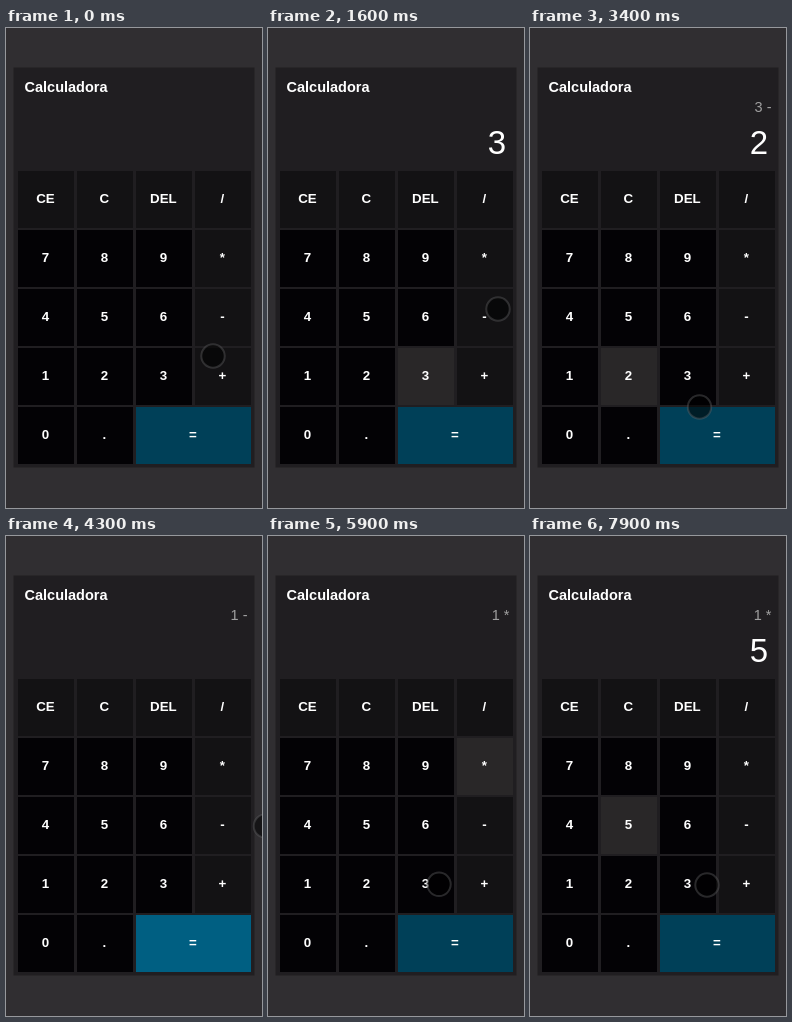
Write an HTML page that moves like this. It is 256 px wide and 480 px high and loops after 8000 ms.

```html
<!DOCTYPE html>
<html lang="es">
<head>
<meta charset="utf-8">
<title>Calculadora</title>
<style>
  html, body { margin: 0; width: 100%; height: 100%; overflow: hidden; background: #302e31; }
  svg { display: block; width: 256px; height: 480px; font-family: "Liberation Sans", Arial, sans-serif; }
  .panel { fill: #201e21; }
  .title { font-size: 14.5px; font-weight: bold; fill: #fff; }
  .pending { font-size: 14.5px; fill: #a0a0a0; text-anchor: end; }
  .entry { font-size: 33px; fill: #fff; text-anchor: end; }
  .key rect { fill: #131214; }
  .key text { font-size: 13.33px; font-weight: bold; fill: #fff; text-anchor: middle; }
  .digit rect { fill: #030205; }
  .equals rect { fill: #004058; }
  .key.focus rect { fill: #292728; }
  .equals.focus rect { fill: #005f82; }
  .pointer { fill: rgba(0, 0, 0, .55); stroke: rgba(100, 100, 103, .4); stroke-width: 2; }
</style>
</head>
<body>
<svg viewBox="0 0 256 480">
  <rect class="panel" x="7.5" y="39.5" width="241" height="400"/>
  <text class="title" x="18.5" y="64">Calculadora</text>
  <text class="pending" x="241.5" y="84"></text>
  <text class="entry" x="238" y="125.5"></text>
  <g id="keys"></g>
  <circle class="pointer" r="11.7"/>
</svg>
<script>
const LOOP = 8000, TICK = 100, REST = 100;
const PITCH = 59, WIDTH = 56, HEIGHT = 57;
const rows = ['CE C DEL /', '7 8 9 *', '4 5 6 -', '1 2 3 +', '0 . ='];

// Each leg takes the pointer to (x, y) on an arc, then presses the key
const home = { x: 207, y: 328, press: -REST };
const legs = [
  { key: '3', x: 160, y: 360, travel: 800, press: 800, bend: 0 },
  { key: '-', x: 230, y: 281, travel: 700, press: 1800, bend: 30 },
  { key: '2', x: 98, y: 350, travel: 800, press: 2800, bend: 79 },
  { key: '=', x: 200, y: 398, travel: 800, press: 3700, bend: -5 },
  { key: '*', x: 220, y: 232, travel: 800, press: 5600, bend: 55 },
  { key: '5', x: 104, y: 291, travel: 300, press: 6800, bend: -112 },
  { key: '', x: 177, y: 349, travel: 1000, press: LOOP, bend: 30 }
];

const $ = s => document.querySelector(s);
const keys = {};

function add(parent, tag, attrs, text = '') {
  const el = document.createElementNS('http://www.w3.org/2000/svg', tag);
  for (const name in attrs) el.setAttribute(name, attrs[name]);
  el.textContent = text;
  return parent.appendChild(el);
}

rows.forEach((row, r) => row.split(' ').forEach((label, c) => {
  const x = 12 + c * PITCH, y = 143 + r * PITCH;
  const width = label === '=' ? WIDTH + PITCH : WIDTH;
  const kind = label === '=' ? ' equals' : /[\d.]/.test(label) ? ' digit' : '';
  const key = keys[label] = add($('#keys'), 'g', { class: 'key' + kind });
  add(key, 'rect', { x, y, width, height: HEIGHT });
  add(key, 'text', { x: x + width / 2 - .6, y: y + 32 }, label);
}));

// The display after a list of key presses
function calculate(pressed) {
  let total = 0, op = '', entry = '';
  for (const key of pressed) {
    if (/\d/.test(key)) {
      entry += key;
    } else {
      if (key === '=') {
        total = op === '-' ? total - entry : total * entry;
      } else {
        if (entry) total = +entry;
        op = key;
      }
      entry = '';
    }
  }
  return { pending: op && `${total} ${op}`, entry };
}

function pointerAt(t) {
  const i = legs.findIndex(leg => t < leg.press);
  const to = legs[i], from = legs[i - 1] || home;
  const f = Math.max(0, Math.min(1, (t - from.press - REST) / to.travel));
  const u = f * f * (3 - 2 * f);
  const dx = to.x - from.x, dy = to.y - from.y;
  const arc = to.bend * Math.sin(Math.PI * u) / Math.hypot(dx, dy);
  return [from.x + dx * u - dy * arc, from.y + dy * u + dx * arc];
}

function draw(t) {
  const pressed = legs.filter(leg => leg.press <= t).map(leg => leg.key);
  const { pending, entry } = calculate(pressed);
  $('.pending').textContent = pending;
  $('.entry').textContent = entry;
  for (const label in keys) keys[label].classList.toggle('focus', label === pressed.at(-1));
  const [x, y] = pointerAt(t);
  $('.pointer').setAttribute('cx', x);
  $('.pointer').setAttribute('cy', y);
}

const start = performance.now();
function loop() {
  const t = (performance.now() - start) % LOOP;
  draw(Math.floor(t / TICK) * TICK);
  requestAnimationFrame(loop);
}
loop();
</script>
</body>
</html>
```
